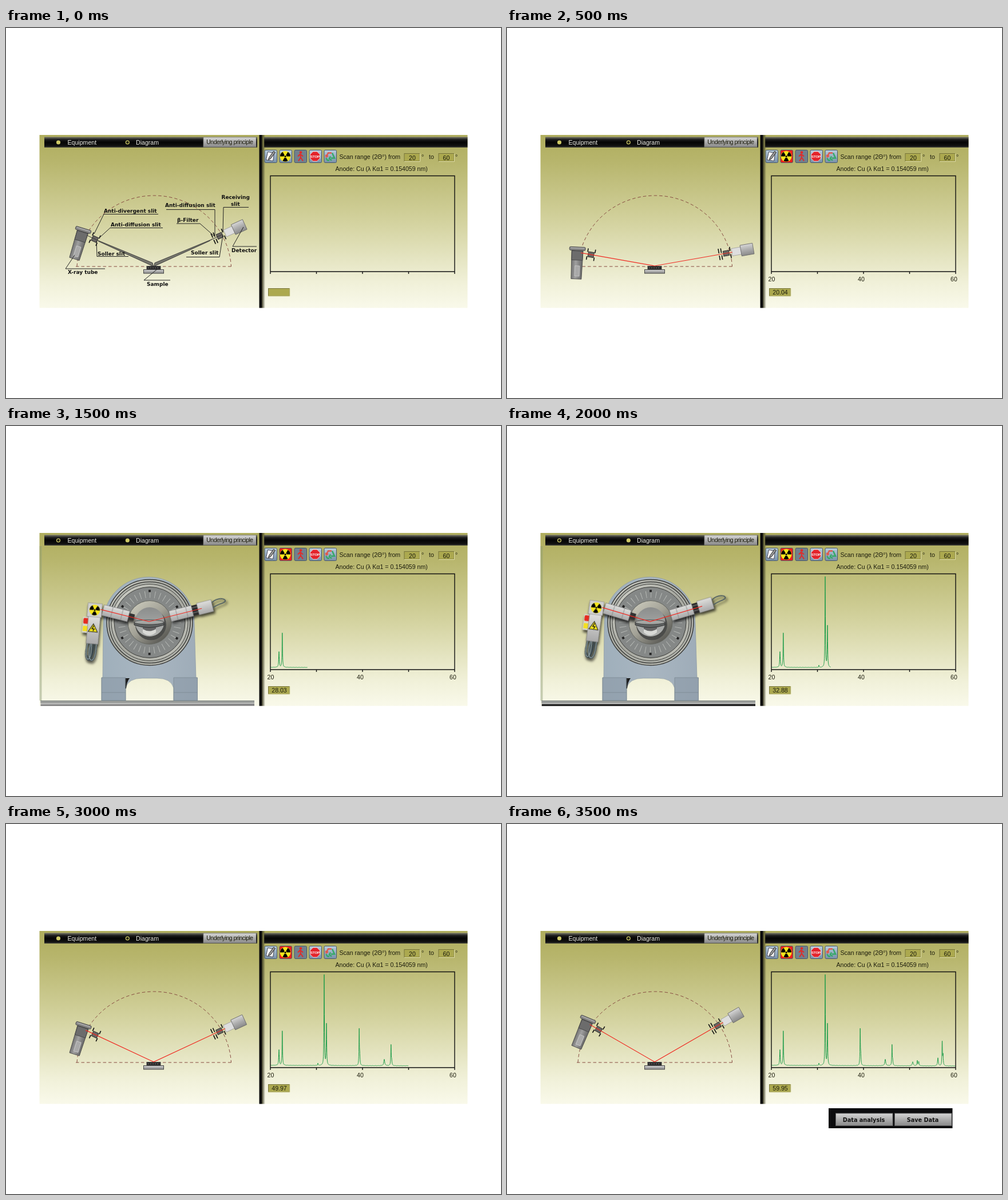
An HTML page that plays this animation: 865x647 px, repeating every 4 s.

```html
<!DOCTYPE html>
<html lang="en">
<head>
<meta charset="utf-8">
<title>X-ray diffraction scan</title>
<style>
html, body { margin: 0; height: 100%; overflow: hidden; background: #fff }
svg { display: block; width: 100vw; height: 100vh }
text { font: 10.6px "Liberation Sans", Arial, sans-serif; fill: #1c1c0c }
.light text { fill: #f0f0e8 }
.bold text { font: bold 9px "DejaVu Sans", Verdana, sans-serif; fill: #111 }
.mid { text-anchor: middle }
.line { fill: none; stroke: #222; stroke-width: 1 }
.field rect { fill: #aca94f; stroke: #77743a }
.field path { fill: none; stroke: #e2e0a8 }
.beam { fill: none; stroke: #f02a22; stroke-width: 1.2 }
.shade { filter: drop-shadow(2px 4px 2px #000a) }
</style>
</head>
<body>
<svg viewBox="0 0 865 647" preserveAspectRatio="none">
<defs>
  <linearGradient id="olive" x2="0" y2="1"><stop stop-color="#afad5d"/><stop offset=".15" stop-color="#b7b56c"/><stop offset=".5" stop-color="#d3d29e"/><stop offset=".85" stop-color="#f0f0d8"/><stop offset="1" stop-color="#f9f9ea"/></linearGradient>
  <linearGradient id="bar" x2="0" y2="1"><stop stop-color="#77776a"/><stop offset=".25" stop-color="#1c1c1c"/><stop offset=".5" stop-color="#050505"/><stop offset=".85" stop-color="#111"/><stop offset="1" stop-color="#44443a"/></linearGradient>
  <linearGradient id="steel" x2="0" y2="1"><stop stop-color="#d6d6d6"/><stop offset=".5" stop-color="#adadad"/><stop offset="1" stop-color="#8a8a8a"/></linearGradient>
  <linearGradient id="arm" x2="0" y2="1"><stop stop-color="#dededc"/><stop offset="1" stop-color="#a9a9a9"/></linearGradient>
  <linearGradient id="tube"><stop stop-color="#707070"/><stop offset=".4" stop-color="#a0a0a0"/><stop offset="1" stop-color="#666"/></linearGradient>
  <linearGradient id="key" x2="0" y2="1"><stop stop-color="#b9cddd"/><stop offset="1" stop-color="#7890a8"/></linearGradient>
  <linearGradient id="edge"><stop stop-color="#3c3b24"/><stop offset="1" stop-color="#3c3b24" stop-opacity="0"/></linearGradient>
  <linearGradient id="body"><stop stop-color="#9fafbb"/><stop offset=".5" stop-color="#a9b6c1"/><stop offset="1" stop-color="#9eacb8"/></linearGradient>
  <linearGradient id="disc" x2="1" y2="1"><stop stop-color="#d3d4cc"/><stop offset=".5" stop-color="#a6a79f"/><stop offset="1" stop-color="#c4c5bd"/></linearGradient>
  <linearGradient id="hub" x2=".9" y2="1"><stop stop-color="#d2d1c2"/><stop offset=".5" stop-color="#a3a297"/><stop offset="1" stop-color="#4a4a46"/></linearGradient>
  <linearGradient id="dome" x2="0" y2="1"><stop stop-color="#8b8d8c"/><stop offset="1" stop-color="#b3b5b3"/></linearGradient>
  <linearGradient id="table" x2=".03" y2=".3" spreadMethod="reflect"><stop stop-color="#c9cac8"/><stop offset="1" stop-color="#6c6b6d"/></linearGradient>
  <g id="trefoil"><circle r="9.500" fill="#f5e51c"/><path id="blade" d="M0 0H-9A9 9 0 0 1-4.500-7.800Z"/><use href="#blade" transform="rotate(120)"/><use href="#blade" transform="rotate(240)"/><circle r="2.400" fill="#f5e51c"/><circle r="1.500"/></g>
</defs>

<rect x="58.5" y="187" width="748" height="302.5" fill="url(#olive)"/>

<g id="diagram">
  <g fill="none" stroke="#85483f" stroke-dasharray="5.5 4">
    <path d="M124 417A135 132 0 0 1 393.500 417"/><path d="M122 417H397"/>
  </g>
  <g fill="#858585" stroke="#444">
    <rect x="240.500" y="422.500" width="35" height="6.500" fill="url(#steel)"/>
    <rect x="246" y="416.500" width="24" height="6" fill="#2b2b2b"/>
    <path d="M248 419.500h20" stroke="#777" stroke-dasharray="2 2"/>
  </g>
  <g id="source">
    <g transform="translate(-138 -6.200)rotate(-7.500)" stroke="#444" stroke-width=".8">
      <path d="M-10 3H10L9 53H-9Z" fill="url(#tube)"/>
      <rect x="-9.500" y="4" width="19" height="16" fill="#6c6c6c"/>
      <rect x="-3" y="30" width="8" height="18" fill="#a9a9a9" stroke="#ccc"/>
      <rect x="-14" y="-3" width="28" height="6" rx="2" fill="#858585"/>
      <path d="M-12-1H12" stroke="#ccc"/>
    </g>
    <rect x="-118" y="-4.500" width="10" height="9" fill="#696662" stroke="#333"/>
    <path d="M-119.500-10v6m0 8v6M-106.500-10v6m0 8v6" stroke="#111" stroke-width="1.600"/>
  </g>
  <g id="detector">
    <rect x="137" y="-6.500" width="17" height="13" fill="#dedede" stroke="#999" stroke-width=".7"/>
    <rect x="153" y="-9.500" width="22" height="19" fill="url(#steel)" stroke="#666" stroke-width=".8"/>
    <rect x="122" y="-4.500" width="10" height="9" fill="#696662" stroke="#333"/>
    <path d="M114.500-10v8m0 4v8M118.800-10v8m0 4v8M134.500-10v7m0 6v7" stroke="#111" stroke-width="1.600"/>
  </g>
  <path id="ray" class="beam"/>
</g>

<g id="labels" class="bold">
  <g fill="#77776e" stroke="#333" stroke-width=".8">
    <path transform="translate(258 416)rotate(24.600)" d="M-128 0H-106L-4-4L0 1L-106 1"/>
    <path transform="translate(258 416)rotate(-24.600)" d="M132 0H108L4-4L0 1L108 1"/>
  </g>
</g>

<g id="machine">
  <rect x="58.500" y="210" width="4" height="270" fill="#8b9a72" fill-opacity=".45"/>
  <rect x="60.500" y="480" width="373.500" height="9.500" fill="url(#table)"/>
  <rect x="60.500" y="480" width="373.500" height="4.500" fill="#a2a6a2" fill-opacity=".8"/>
  <rect id="tableEdge" x="61" y="486.500" width="373" height="3" fill="#151515"/>
  <path d="M60 480.500H434" stroke="#7f857f"/>
  <path d="M170 344A79.500 80 0 0 1 329 344L332 440H334.500V480H293V458Q288 441 264 441H238Q214 441 209 458V480H167V440H169Z" fill="url(#body)" stroke="#8b98a3" stroke-width=".7"/>
  <path d="M208 459V441H216Q211 447 210 459Z" fill="#1a1a1a"/>
  <path d="M167 440H209V480H167ZM293 440H334.500V480H293ZM167 466H209M293 466H334" fill="#8795a3" fill-opacity=".5" stroke="#78858f" stroke-width=".7"/>
  <g transform="translate(251 343.500)">
    <g stroke="#3c3d3a">
      <circle r="75" fill="url(#disc)" stroke-width="1.500"/><circle r="71" fill="#aeb0a9" stroke-width="1.500"/><circle r="67" fill="url(#disc)"/><circle r="62" fill="#858887"/>
    </g>
    <circle r="49" fill="none" stroke="#b9bcb8" stroke-width="12" stroke-dasharray=".9 7.652"/>
    <circle r="55" fill="none" stroke="#222" stroke-width="4" stroke-dasharray="4 53.596" transform="rotate(-92)"/>
    <circle r="38" fill="url(#hub)" stroke="#656760"/>
    <circle cx="2" cy="4" r="27" fill="#4b4c4a"/>
    <circle cy="-1" r="25.500" fill="url(#dome)"/>
  </g>
  <g id="armLeft" class="shade">
    <rect x="-37" y="-6" width="10" height="11" fill="#333"/>
    <rect x="-83" y="-9.500" width="46" height="19" fill="url(#arm)" stroke="#777" stroke-width=".6"/>
    <path d="M-67-9v18M-49-9v18" stroke="#777" stroke-width=".7"/>
    <g transform="translate(-97 3.600)rotate(-9)">
      <g id="cables" fill="none"><path id="cable" d="M-7 58C-12 88-2 95 0 76V58M-2 58C-8 92 8 99 8 68V58M4 58C4 90-5 93-7 80" stroke="#3d4a4e" stroke-width="3"/><use href="#cable"/><path d="M-7 58C-12 88-2 95 0 76V58M-2 58C-8 92 8 99 8 68V58" stroke="#a9babd"/></g>
      <rect x="-19" y="13" width="11" height="28" fill="#d7d7cc"/>
      <rect x="-18" y="15" width="9" height="10" rx="2" fill="#e52b20"/><rect x="-18" y="29" width="8" height="9" fill="#f3df20"/>
      <rect x="-10" y="11" width="21" height="48" fill="url(#arm)" stroke="#777" stroke-width=".6"/>
      <rect x="-12.500" y="-12" width="25" height="24" fill="#cfcfce" stroke="#888" stroke-width=".6"/>
      <use href="#trefoil"/>
      <path d="M0 24L8 38H-8Z" fill="#f5e51c" stroke="#111"/>
      <path d="M1 27L-2 33H2L0 37" fill="none" stroke="#111" stroke-width="1.300"/>
    </g>
  </g>
  <g id="armRight" class="shade">
    <path d="M112-4C122-12 136-9 138-4S122-1 113 4" fill="none" stroke="#4d5c60" stroke-width="1.800"/>
    <rect x="76" y="-9" width="13" height="18" fill="#2c2c2c"/>
    <path d="M78-5H89M78 4H89" stroke="#888"/>
    <rect x="38" y="-9.500" width="40" height="19" fill="url(#arm)" stroke="#777" stroke-width=".6"/>
    <path d="M50-9v18M68-9v18" stroke="#777" stroke-width=".7"/>
    <rect x="88" y="-11" width="26" height="21" fill="url(#arm)" stroke="#777" stroke-width=".6"/>
  </g>
  <path d="M239 351V361Q250 371 262 361V351Z" fill="#d8d9d6"/>
  <path d="M239 351V355Q250 362 262 355V351Z" fill="#666"/>
  <path d="M224 343V348Q250 357 276 348V343Z" fill="#5f6262" stroke="#222" stroke-width=".8"/>
  <ellipse cx="250" cy="343" rx="26" ry="4" fill="#a4a6a3" stroke="#333" stroke-width=".8"/>
  <path id="machineRay" class="beam"/>
</g>

<g class="light">
  <rect x="67" y="190.500" width="372" height="18.500" fill="url(#bar)"/>
  <rect x="451" y="190.500" width="355.500" height="18.500" fill="url(#bar)"/>
  <g stroke="#cfca66" stroke-width="1.300"><circle id="dotA" cx="91.500" cy="200" r="2.900"/><circle id="dotB" cx="212.300" cy="200" r="2.900"/></g>
  <text x="107.500" y="204">Equipment</text><text x="227" y="204">Diagram</text>
</g>
<rect x="345" y="191" width="92" height="17" fill="url(#steel)" stroke="#85857f" stroke-width=".8"/>
<text class="mid" x="391" y="203" style="font-size:10.400px;letter-spacing:-.5px">Underlying principle</text>
<rect x="447" y="187" width="6" height="302.500" fill="url(#edge)"/>
<rect x="442.500" y="187" width="4.500" height="302.500" fill="#0b0b0b"/>

<g id="keys"></g>
<g transform="translate(462.500 224.500)"><path d="M-5-8L6-6L4 8L-8 6Z" fill="#fff" stroke="#445"/><path d="M8-7L0 4L-4 6L-3 2L5-9Z" fill="#999" stroke="#222"/></g>
<use href="#trefoil" x="488" y="224.500"/>
<g transform="translate(514 224.500)" fill="none" stroke="#e22a28" stroke-width="1.900"><circle cx="1" cy="-7" r="1.400" fill="#e22a28"/><path d="M0-4L1 2L5 8M1 2L-3 8M0-4L-4 0M0-4L5 0"/></g>
<path transform="translate(540 224.500)" d="M-3.500-8.500H3.500L8.500-3.500V3.500L3.500 8.500H-3.500L-8.500 3.500V-3.500Z" fill="#e3242b" stroke="#fff" stroke-width=".7"/>
<text class="mid" x="540" y="227" style="font-size:6px;font-weight:bold;fill:#fff">STOP</text>
<g transform="translate(566 224.500)" fill="none" stroke-width="2.500"><path d="M-7 2L-3-6L3-6M-8-2L-3 0" stroke="#e0584c"/><path d="M4-6L8 3H2M1 0L-1 4L3 7M-7 3L-4 7H-1" stroke="#36a968"/></g>

<text x="582.500" y="229">Scan range (2Θ°) from</text><text x="726" y="229">°</text><text x="739" y="229">to</text><text x="785" y="229">°</text>
<text x="575.500" y="250">Anode: Cu (λ Kα1 = 0.154059 nm)</text>
<g class="field mid">
  <rect x="696" y="219.500" width="27" height="13.500"/><path d="M696 233.500h27.500v-14"/><text x="710" y="230.500">20</text>
  <rect x="756" y="219.500" width="27" height="13.500"/><path d="M756 233.500h27.500v-14"/><text x="769.500" y="230.500">60</text>
  <rect x="458.500" y="455.500" width="37" height="13"/><path d="M458 469h38v-14"/><text id="angle" x="477.500" y="466"></text>
</g>
<path id="trace" fill="none" stroke="#1f9d4a" stroke-linejoin="round"/>
<path d="M462 258.500H784V426H462ZM462 426v4M542.500 426v4M623 426v4M703.500 426v4M784 426v4" fill="none" stroke="#111" stroke-width="1.400"/>
<g id="axis" class="mid"><text x="462.500" y="442.500">20</text><text x="619" y="442.500">40</text><text x="781" y="442.500">60</text></g>

<g id="results" class="bold mid">
  <rect x="562" y="497" width="216.500" height="35" fill="#0c0c0e"/>
  <g fill="url(#steel)" stroke="#666"><rect x="574.500" y="506" width="99.500" height="21.500"/><rect x="677.500" y="506" width="99.500" height="21.500"/></g>
  <text x="623.500" y="521" style="font-size:9.700px">Data analysis</text><text x="726.500" y="521" style="font-size:9.700px">Save Data</text>
</g>
</svg>

<script>
const $ = id => document.getElementById(id);
const show = (id, on) => $(id).setAttribute('display', on ? 'inline' : 'none');
const set = (id, name, value) => $(id).setAttribute(name, value);
const STEP = 500;
const MACHINE = [3, 4];
const scan = [null, 20.04, 22.52, 28.03, 32.88, 39.98, 49.97, 59.95];   // 2θ at each step

// [text, x, baseline, leader path]
const labels = [
  ['Anti-divergent slit', 171, 323, 'M266 325.5H171L154 360'],
  ['Anti-diffusion slit', 183, 347, 'M274 349.5H182L163 367'],
  ['Soller slit', 160, 398, 'M214 399.5H159L158 372'],
  ['X-ray tube', 108, 430, 'M173 421H104L120 397'],
  ['Sample', 246, 451, 'M287 441H241L265 421'],
  ['Anti-diffusion slit', 278, 313, 'M280 317.500H365V362'],
  ['Receiving', 376.500, 299, ''],
  ['slit', 393, 311, 'M424 313.500H380L379 357'],
  ['β-Filter', 299, 339, 'M298 342H339L364 364'],
  ['Soller slit', 323, 396, 'M315 400.500H373L379 362'],
  ['Detector', 394, 392, 'M438 382H396L415 348']
];
$('labels').innerHTML += labels.map(([text, x, y, line]) =>
  `<path class="line" d="${line}"/><text x="${x}" y="${y}">${text}</text>`).join('');

$('keys').innerHTML = [0, 1, 2, 3, 4].map(i =>
  `<rect id="key${i}" x="${452 + i * 26}" y="213.500" width="21.500" height="22" rx="2" fill="${i == 2 ? '#71808d' : 'url(#key)'}" stroke="#46566a"/>`).join('');

// [x, height, half width]
const peaks = [
  [477, 27, .6], [482.800, 60, .5], [545, 4, .4], [556, 158, .45], [560, 72, .5],
  [617.200, 62, .45], [618.200, 16, .5], [661, 11, 1], [672.800, 36, .5], [674, 8, .5],
  [709, 7, 1], [717, 9, .6], [719.500, 7, .7], [753, 14, .8], [760.500, 43, .5], [762, 18, .5]
];
const level = x => 422 + (x - 462) / 300 + .3 * Math.sin(x * 1.7) * Math.sin(x * .43)
  - peaks.reduce((sum, [c, h, w]) => sum + h / (1 + ((x - c) / w) ** 2), 0);

function tracePath(angle) {
  const end = 462 + (angle - 20) * 8.05;
  let d = `M462 ${level(462)}`;
  for (let x = 462; x < end; x += .2) d += `L${x.toFixed(1)} ${level(x).toFixed(2)}`;
  return d;
}

function rays(cx, cy, left, right, theta) {
  const a = theta * Math.PI / 180, c = Math.cos(a), s = Math.sin(a);
  return `M${cx - left * c} ${cy - left * s}L${cx} ${cy}L${cx + right * c} ${cy - right * s}`;
}

function draw(step) {
  const angle = scan[step], on = angle !== null, theta = on ? angle / 2 : 24.5;
  const machine = MACHINE.includes(step);
  show('diagram', !machine);
  show('machine', machine);
  show('tableEdge', step == 4);
  show('labels', !on);
  show('ray', on);
  show('axis', on);
  show('results', step == 7);
  set('source', 'transform', `translate(258 416)rotate(${theta})`);
  set('detector', 'transform', `translate(258 416)rotate(${-theta})`);
  set('armLeft', 'transform', `translate(250 342)rotate(${theta})`);
  set('armRight', 'transform', `translate(250 342)rotate(${-theta})`);
  set('ray', 'd', rays(258, 416, 131, 138, theta));
  set('machineRay', 'd', rays(250, 342, 87, 95, theta));
  set('dotA', 'fill', machine ? 'none' : '#cfca66');
  set('dotB', 'fill', machine ? '#cfca66' : 'none');
  set('key1', 'fill', on ? '#f0201c' : 'url(#key)');
  set('trace', 'd', on ? tracePath(angle) : '');
  $('angle').textContent = on ? angle.toFixed(2) : '';
}

let shown = -1;
const start = performance.now();
function tick() {
  const step = Math.floor((performance.now() - start) / STEP) % scan.length;
  if (step != shown) draw(shown = step);
  requestAnimationFrame(tick);
}
tick();
</script>
</body>
</html>
```
